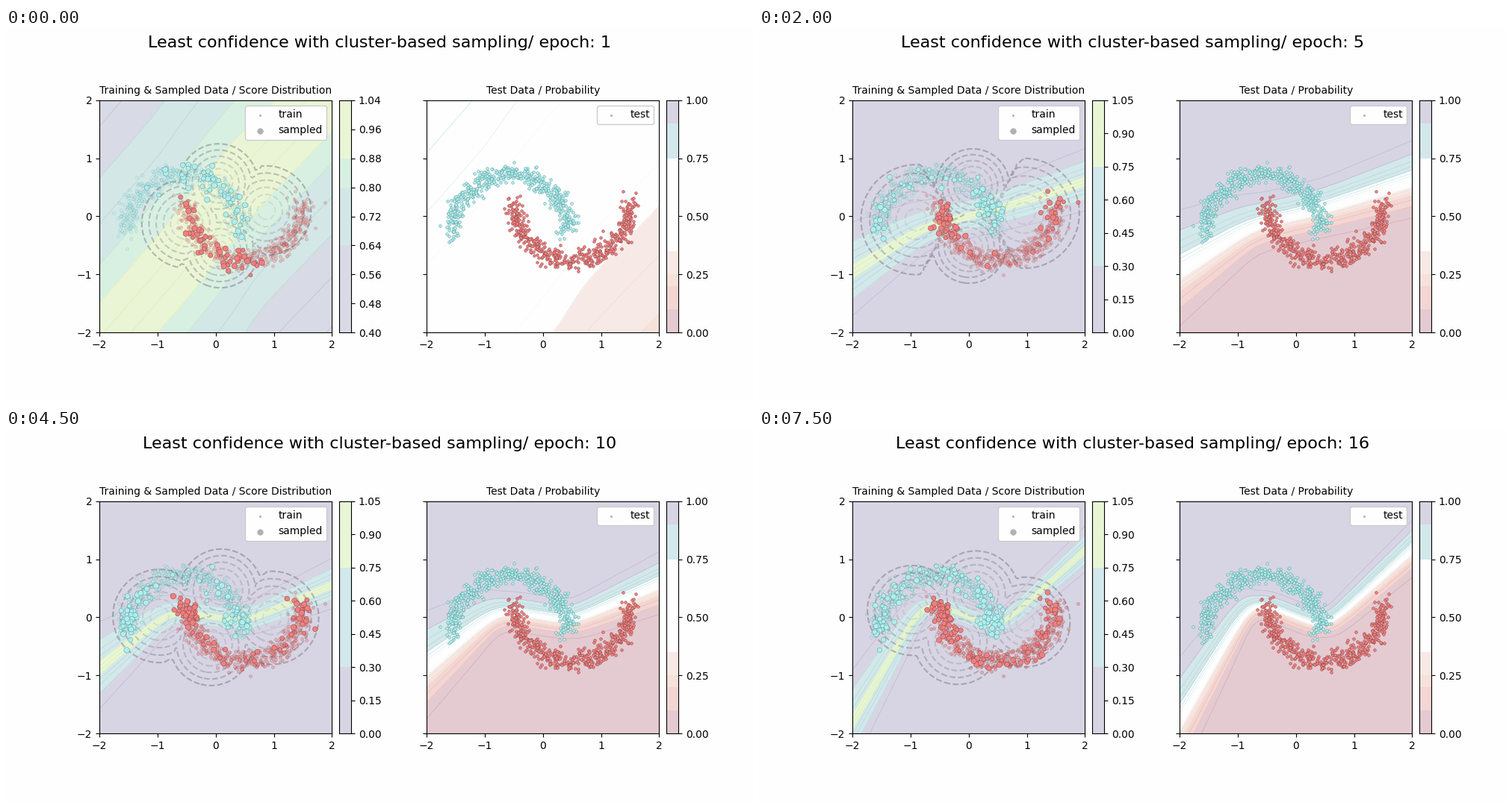
These frames come from a looping animation (1000x500 px, 8000 ms). A matplotlib script:

```python
import numpy as np
import matplotlib.pyplot as plt
from matplotlib.animation import FuncAnimation
from matplotlib.colors import to_rgb

EPOCHS = 16
LAVENDER, BLUE, LIME = "#d7d5e3", "#d3e8ea", "#e9f6d6"
PAPER = "#fefefe"
CYAN, CORAL = "#afeeee", "#f08080"
CYAN_EDGE, CORAL_EDGE = "#5c9a9a", "#8a4444"

FIRST_LEVELS = np.linspace(0.40, 1.04, 9)
FIRST_BANDS = ["#d8dae5"] * 3 + ["#d3e7e6"] * 2 + ["#d8f0e2"] + ["#eaf5d5"] * 2
SCORE_LEVELS = np.linspace(0, 1.05, 8)
SCORE_BANDS = [LAVENDER] * 2 + [BLUE] * 3 + [LIME] * 2
PROB_LEVELS = np.linspace(0, 1, 21)
PROB_BANDS = (["#e4cbd1"] * 2 + ["#f3d6d3"] * 2 + ["#f7e2da"] + ["#f7eae6"] * 2
              + [PAPER] * 8 + [BLUE] * 3 + [LAVENDER] * 2)

KNEE_LEFT, KNEE_RIGHT = -0.75, 0.5


def hinge(t, soft=0.12):
    return soft * np.logaddexp(0, t / soft)


def boundary(x, s):
    """Height of the p = 0.5 line: three slopes joined at two soft knees."""
    mid = 1.15 * np.exp(-s / 2.8) + 0.1 - 0.035 * s
    left = np.exp(-s / 4) + 0.15 + 0.0068 * s ** 2
    right = 0.9 * np.exp(-s / 2) + 0.14 + 0.0034 * s ** 2
    return (mid * x + (right - mid) * hinge(x - KNEE_RIGHT)
            + (mid - left) * hinge(KNEE_LEFT - x))


def width(x, s):
    """Vertical softness of the transition, wider outside the knees."""
    slope = (boundary(x + 0.05, s) - boundary(x - 0.05, s)) / 0.1
    spread = 1 - np.exp(-(s / 4) ** 2)
    outside = 0.9 * hinge(KNEE_LEFT - x) + 0.3 * hinge(x - KNEE_RIGHT)
    base = 0.095 - 0.003 * s + 1.9 * np.exp(-1.2 * s)
    return base * np.hypot(1, slope) * (1 + spread * outside)


def probability(x, y, s):
    dist = y - boundary(x, s)
    z = np.abs(dist) / width(x, s) / np.where(dist > 0, 1.15, 1)
    logit = np.sign(dist) * (np.sqrt(1 + 0.8 * z) - 1) / 0.4
    return 1 / (1 + np.exp(-logit))


def score(p):
    return 2 * np.minimum(p, 1 - p)


def cluster_field(x, y, s):
    """Distance to the nearest cluster centre, relative to its radius."""
    settle = 1 - np.exp(-s / 2)
    bump = s / 2 * np.exp(1 - s / 2)
    outer, inner = 0.77 + 0.24 * bump, 0.67 + 0.005 * s - 0.08 * bump
    centres = np.array([
        (0.05 + 0.005 * s, 0.58 - 0.012 * s),
        (-0.50 - 0.47 * settle, -0.12 + 0.016 * s),
        (0.08 - 0.018 * s, -0.56 + 0.01 * s),
        (0.87 + 0.10 * settle, 0.10 - 0.012 * s),
    ])
    radius = np.array([inner, outer, inner, outer])
    dist = np.hypot(x[..., None] - centres[:, 0], y[..., None] - centres[:, 1])
    return dist.min(axis=-1) / radius[dist.argmin(axis=-1)]


def moons(n, noise, seed):
    rng = np.random.default_rng(seed)
    t = np.linspace(0, np.pi, n)
    upper = np.c_[np.cos(t) - 0.56, np.sin(t) - 0.28]
    lower = np.c_[0.5 - np.cos(t), 0.25 - np.sin(t)]
    return t, [m + rng.normal(0, noise, m.shape) for m in (upper, lower)]


def line_color(band, level):
    if band == PAPER:
        tint = "#e3bdb5" if level < 0.5 else "#a5dcdc"
        return (*to_rgb(tint), np.clip(6 * abs(level - 0.5) - 0.5, 0, 0.8))
    return tuple(c ** 2 for c in to_rgb(band)) + (0.8,)


def bands(ax, field, levels, colors):
    ax.contourf(GX, GY, np.clip(field, levels[0] + 1e-6, levels[-1] - 1e-6),
                levels=levels, colors=colors, zorder=0)
    inner = levels[1:-1]
    ax.contour(GX, GY, field, levels=inner, linewidths=0.5, linestyles="solid",
               colors=[line_color(c, v) for c, v in zip(colors[1:], inner)],
               zorder=0.5)


def dots(ax, groups, size, alpha, zorder, lw=0.35):
    for pts, face, edge in zip(groups, (CYAN, CORAL), (CYAN_EDGE, CORAL_EDGE)):
        ax.scatter(pts[:, 0], pts[:, 1], s=size, c=face, edgecolors=edge,
                   linewidths=lw, alpha=alpha, zorder=zorder)


def color_scale(ax, levels, colors, ticks):
    ax.clear()
    for low, high, c in zip(levels, levels[1:], colors):
        ax.axhspan(low, high, color=c, lw=0)
    ax.set(xlim=(0, 1), ylim=(levels[0], levels[-1]), xticks=[], yticks=ticks)
    ax.set_yticklabels([f"{t:.2f}" for t in ticks])
    ax.yaxis.tick_right()


def frame_axes(ax, title, labels):
    ax.set(xlim=(-2, 2), ylim=(-2, 2), xticks=range(-2, 3), yticks=range(-2, 3))
    ax.tick_params(labelleft=labels)
    ax.set_title(title, fontsize=10)


def key(ax, entries):
    for name, size in entries:
        ax.scatter([], [], s=size, c="#b3afb4", linewidths=0.5, label=name)
    box = ax.legend(loc="upper right", framealpha=1, facecolor=PAPER)
    box.set_zorder(6)


def pick_samples(s):
    rng = np.random.default_rng(100 + s)
    n = 52 + 4 * s
    chosen = []
    for pts in TRAIN:
        if s == 0:
            weight = np.where(TURN < 1.85, 1.0, 0.005)
        else:
            weight = score(probability(pts[:, 0], pts[:, 1], s)) ** 1.3 + 0.02
        chosen.append(pts[rng.choice(len(pts), n, False, weight / weight.sum())])
    return chosen, rng.uniform(12, 30, n)


GX, GY = np.meshgrid(np.linspace(-2, 2, 160), np.linspace(-2, 2, 160))
CX, CY = np.meshgrid(np.linspace(-2, 2, 80), np.linspace(-2, 2, 80))
TURN, TRAIN = moons(500, 0.1, 3)
TEST = moons(500, 0.085, 8)[1]

fig = plt.figure(figsize=(10, 5), dpi=100, facecolor=PAPER)
heading = fig.suptitle("", fontsize=16)

# Two cells with a 0.3 gap; each holds a square plot, 10 px and a 5 % bar
CELL = 775 / 2.3
SIDE = (CELL - 10) / 1.05


def add_panel(x, w):
    return fig.add_axes([x / 1000, 0.495 - SIDE / 1000, w / 1000, SIDE / 500],
                        facecolor=PAPER)


def add_pair(x):
    return add_panel(x, SIDE), add_panel(x + SIDE + 10, SIDE * 0.05)


left, left_bar = add_pair(125)
right, right_bar = add_pair(125 + 1.3 * CELL)
color_scale(right_bar, PROB_LEVELS, PROB_BANDS, np.linspace(0, 1, 5))


def draw(step):
    heading.set_text("Least confidence with cluster-based sampling/ "
                     f"epoch: {step + 1}")
    p = probability(GX, GY, step)

    left.clear()
    levels, colors = ((FIRST_LEVELS, FIRST_BANDS) if step == 0
                      else (SCORE_LEVELS, SCORE_BANDS))
    bands(left, score(p), levels, colors)
    dots(left, TRAIN, 8, 0.36 + 0.012 * step, 1.5)
    greys = [(0.45, 0.40, 0.46, a) for a in np.linspace(0.12, 0.45, 6)]
    left.contour(CX, CY, cluster_field(CX, CY, step), levels=np.linspace(0.2, 1, 6),
                 colors=greys, linewidths=1.5, linestyles="dashed", zorder=2)
    samples, sizes = pick_samples(step)
    dots(left, samples, sizes, 1, 3)
    key(left, [("train", 3), ("sampled", 30)])
    frame_axes(left, "Training & Sampled Data / Score Distribution", True)
    color_scale(left_bar, levels, colors, levels)

    right.clear()
    bands(right, p, PROB_LEVELS, PROB_BANDS)
    dots(right, TEST, 7, 1, 2)
    key(right, [("test", 3)])
    frame_axes(right, "Test Data / Probability", False)
    return []


anim = FuncAnimation(fig, draw, frames=EPOCHS, interval=500, repeat=True,
                     repeat_delay=0)
plt.show()
```
